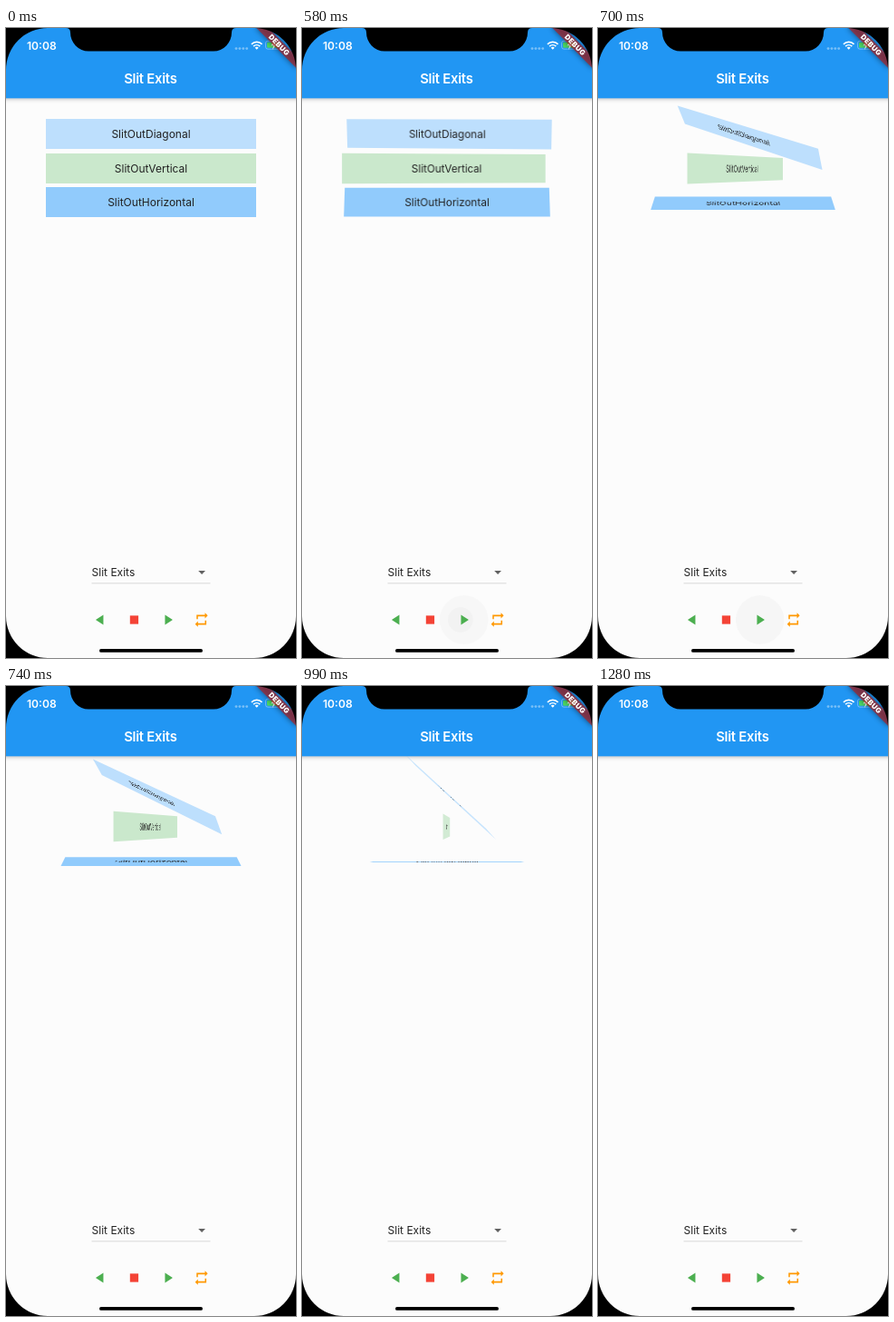
Animation, 320 px wide and 693 px high, one loop 1330 ms. Source, as an HTML page:

```html
<!DOCTYPE html>
<html lang="en">
<head>
<meta charset="utf-8">
<title>Slit Exits</title>
<style>
  html, body { margin: 0; width: 100%; height: 100%; overflow: hidden; background: #fcfcfc; }
  body { position: relative; font: 12px Inter, sans-serif; color: #212121; }
  .card {
    position: absolute; left: 44px; width: 232px; height: 33.4px;
    line-height: 33.4px; text-align: center;
    transform-origin: 50% 18.6px; will-change: transform;
  }
  svg { position: absolute; top: 0; left: 0; will-change: transform; }
  .bar { fill: #2196f3; filter: drop-shadow(0 1.5px 2px rgba(0, 0, 0, .25)); }
  .title { font-size: 14.8px; font-weight: 600; letter-spacing: -.25px; }
  .clock { font-size: 12.1px; font-weight: 600; }
  .debug { font-size: 7.9px; font-weight: 900; letter-spacing: .3px; }
</style>
</head>
<body>
<div class="card" style="top:100.3px; background:#bddffd">SlitOutDiagonal</div>
<div class="card" style="top:137.5px; background:#cae8cc">SlitOutVertical</div>
<div class="card" style="top:174.6px; background:#91cbfc">SlitOutHorizontal</div>

<svg width="320" height="693" viewBox="0 0 320 693">
  <defs>
    <filter id="blur" x="-50%" y="-150%" width="200%" height="400%">
      <feGaussianBlur stdDeviation="3"/>
    </filter>
  </defs>

  <!-- Status bar and title -->
  <rect class="bar" x="-10" y="-10" width="340" height="87.3"/>
  <g fill="#fff">
    <text class="clock" x="23" y="23.6">10:08</text>
    <text class="title" x="159.4" y="61.2" text-anchor="middle">Slit Exits</text>
    <g opacity=".4">
      <circle cx="254" cy="22.6" r="1.4"/><circle cx="257.9" cy="22.6" r="1.4"/>
      <circle cx="261.8" cy="22.6" r="1.4"/><circle cx="265.7" cy="22.6" r="1.4"/>
    </g>
    <path d="M276.7 23.8l-2-2.1a2.9 2.9 0 0 1 4 0z"/>
    <g fill="none" stroke="#fff" stroke-width="1.7">
      <path d="M273.1 20.2a5.2 5.2 0 0 1 7.2 0"/>
      <path d="M270.9 17.8a8.3 8.3 0 0 1 11.6 0"/>
    </g>
  </g>
  <rect x="286.5" y="14.2" width="17" height="9" rx="2.5" fill="none" stroke="#fff" stroke-opacity=".45" stroke-width=".8"/>
  <rect x="288" y="15.7" width="14" height="6" rx="1.3" fill="#4cd964"/>
  <path d="M296.5 13.5l-4 5.8h2.6l-1 4.6 4.2-6h-2.7z" fill="#fff"/>

  <!-- Corner banner -->
  <g transform="translate(320 0) rotate(45)">
    <rect x="-31" y="21.6" width="62" height="9.3" opacity=".5" filter="url(#blur)"/>
    <rect x="-31" y="21.6" width="62" height="9.3" fill="#b71c1c" fill-opacity=".627"/>
    <text class="debug" x="0" y="29.1" text-anchor="middle" fill="#fff">DEBUG</text>
  </g>

  <!-- Dropdown -->
  <text x="94.6" y="603.2" fill="#212121">Slit Exits</text>
  <path d="M212.2 597h7.8l-3.9 3.9z" fill="#616161"/>
  <path d="M94.5 610.8h131" stroke="#d0d0d0" stroke-width=".8"/>

  <!-- Controls -->
  <circle id="glow" cx="178.7" cy="651" r="27"/>
  <circle id="splash" cy="651"/>
  <g id="controls"></g>

  <!-- Device outline -->
  <path d="M66 0Q71 0 71 5A20 20.5 0 0 0 91 25.5H229A20 20.5 0 0 0 249 5Q249 0 254 0Z"/>
  <rect x="103" y="683" width="114" height="3.8" rx="1.9"/>
  <path fill-rule="evenodd" d="M0 0H320V693H0Z
    M0 46A46 46 0 0 1 46 0H274A46 46 0 0 1 320 46V647A46 46 0 0 1 274 693H46A46 46 0 0 1 0 647Z"/>
</svg>

<script>
  const LOOP = 1330;
  const SCALE = 320 / 414;            // stage pixels per logical pixel
  const PERSPECTIVE = SCALE / 0.0015;
  const START = 539, DURATION = 750, TURN = 0.54;

  const CHANGES = [0, 520, 580, 640, 700, 740, 820, 880, 930, 990, 1050, 1110, 1170, 1220, 1280];

  const AXES = ['-1, -1, 0', '0, 1, 0', '1, 0, 0'];
  const cards = document.querySelectorAll('.card');
  const glow = document.getElementById('glow');
  const splash = document.getElementById('splash');

  const ICONS = [
    ['M16 5v14L5 12z', '#4caf50'],
    ['M6 6h12v12H6z', '#f44336'],
    ['M8 5v14l11-7z', '#4caf50'],
    ['M7 7h10v3l4-4-4-4v3H5v6h2zM17 17H7v-3l-4 4 4 4v-3h12v-6h-2z', '#ff9800'],
  ];
  document.getElementById('controls').innerHTML = ICONS.map(([path, color], i) => {
    const x = 160 + (i - 1.5) * 48 * SCALE;
    return `<path d="${path}" fill="${color}"
      transform="translate(${x} 651) scale(${SCALE}) translate(-12 -12)"/>`;
  }).join('');

  const clamp = x => Math.min(1, Math.max(0, x));
  const mix = (a, b, p) => a + (b - a) * p;

  // cubic-bezier(.25, .1, .25, 1)
  function ease(x) {
    const bezier = (a, b, u) => 3 * a * u * (1 - u) ** 2 + 3 * b * u * u * (1 - u) + u ** 3;
    let low = 0, high = 1;
    for (let i = 0; i < 24; i++) {
      const mid = (low + high) / 2;
      if (bezier(.25, .25, mid) < x) low = mid; else high = mid;
    }
    return bezier(.1, 1, low);
  }

  function drawCards(time) {
    const progress = clamp((time - START) / DURATION);
    const turn = ease(clamp(progress / TURN));
    const leave = progress > TURN ? ease((progress - TURN) / (1 - TURN)) : 0;
    const angle = mix(87 * turn, 90, leave);
    const depth = mix(160 * turn, 800, leave) * SCALE;
    cards.forEach((card, i) => {
      card.style.opacity = 1 - leave;
      card.style.transform = progress === 0 ? 'none' :
        `perspective(${PERSPECTIVE}px) translateZ(${-depth}px) rotate3d(${AXES[i]}, ${angle}deg)`;
    });
  }

  function drawTap(time) {
    const grow = clamp((time - 520) / 120);
    const fade = time < 520 ? 0 : clamp((740 - time) / 80);
    glow.setAttribute('opacity', .021 * fade);
    splash.setAttribute('opacity', .025 * fade);
    splash.setAttribute('cx', mix(171, 178.7, grow));
    splash.setAttribute('r', mix(1, 27, grow));
  }

  function frame() {
    const now = performance.now() % LOOP;
    const time = CHANGES.findLast(change => change <= now);
    drawCards(time);
    drawTap(time);
    requestAnimationFrame(frame);
  }
  frame();
</script>
</body>
</html>
```
